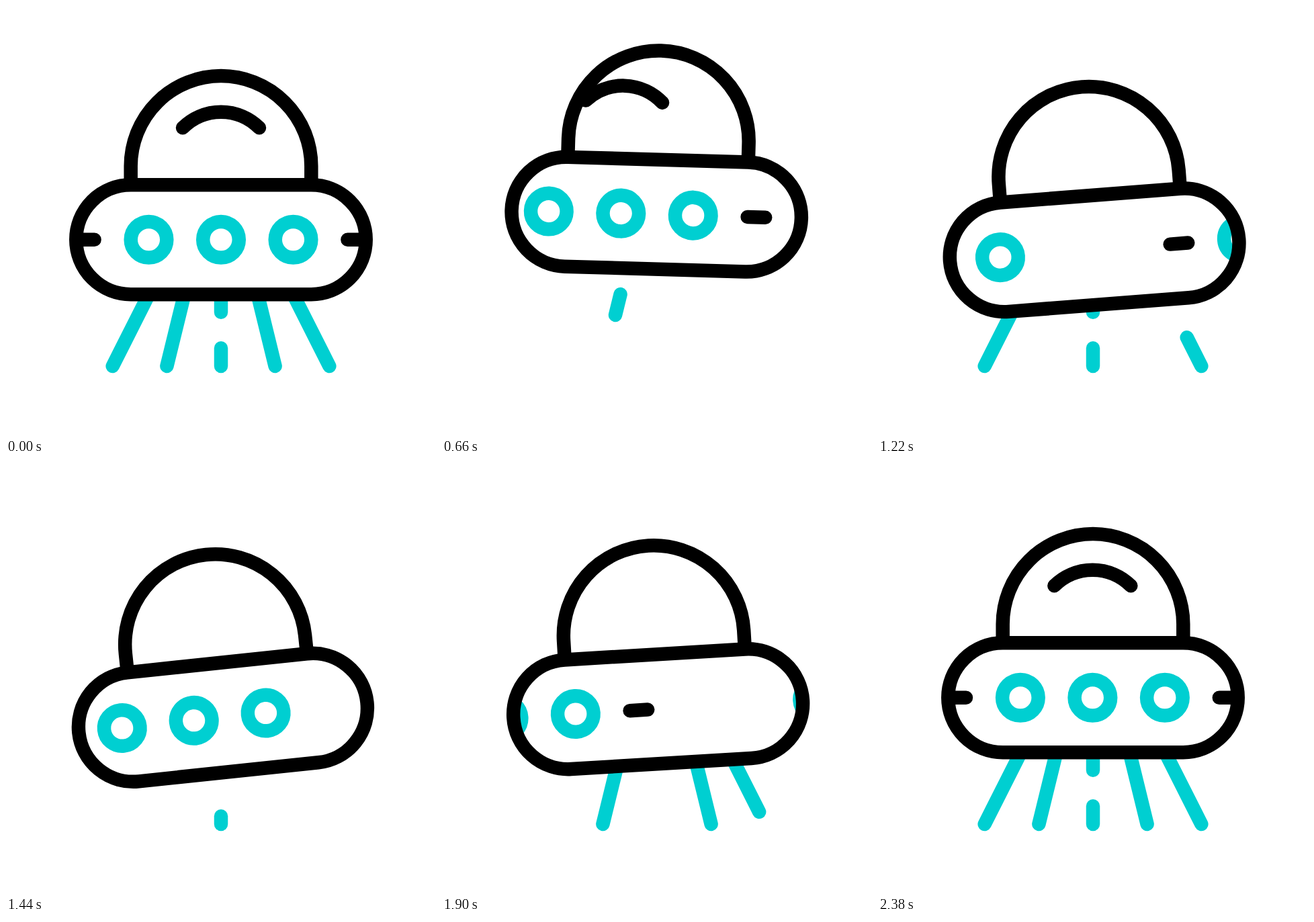
Recreate the animation shown at these times as an HTML page. Size 640 px wide and 640 px high, loop 2.4 s.

```html
<!DOCTYPE html>
<html lang="en">
<head>
<meta charset="utf-8">
<title>Flying saucer</title>
<style>
  html, body { margin: 0; width: 100%; height: 100%; overflow: hidden; background: #fff; }
  svg { display: block; width: 100%; height: 100%; }
  .ink { stroke: #000; }
  .glow { stroke: #00cfd1; }
</style>
</head>
<body>
<svg viewBox="0 0 640 640" fill="none" stroke-width="20.5" stroke-linecap="round">
  <defs>
    <path id="domeShape" d="M185.7 266V238.3A134.3 134.3 0 0 1 454.3 238.3V266"/>
    <rect id="hullShape" x="104.3" y="266.3" width="431.4" height="162.9" rx="81.45"/>
    <clipPath id="domeClip"><use href="#domeShape"/></clipPath>
    <clipPath id="hullClip"><use href="#hullShape"/></clipPath>
    <path id="shine" class="ink" d="M263 181.3A80.6 80.6 0 0 1 377 181.3"/>
    <g id="ports" class="glow">
      <circle cx="212.5" cy="347.7" r="26.8"/>
      <circle cx="320" cy="347.7" r="26.8"/>
      <circle cx="427.5" cy="347.7" r="26.8"/>
    </g>
    <path id="marks" class="ink" d="M105 347.7H131.6M508.4 347.7H535"/>
  </defs>
  <g id="beams" class="glow"></g>
  <g id="ship">
    <use href="#domeShape" fill="#fff"/>
    <g clip-path="url(#domeClip)">
      <g class="strip"><use href="#shine"/><use href="#shine" x="-1152"/></g>
    </g>
    <use href="#domeShape" class="ink" stroke-linecap="butt"/>
    <use href="#hullShape" fill="#fff"/>
    <g clip-path="url(#hullClip)">
      <g class="strip">
        <use href="#ports"/><use href="#marks"/>
        <use href="#ports" x="-576"/>
        <use href="#ports" x="-1152"/><use href="#marks" x="-1152"/>
      </g>
    </g>
    <use href="#hullShape" class="ink"/>
  </g>
</svg>
<script>
const LOOP = 2400, TOP = 429, BOTTOM = 536, SWEEP = 200;
const ship = document.getElementById('ship');
const strips = document.querySelectorAll('.strip');
const beamLayer = document.getElementById('beams');

// x at the top and bottom, lit parts, start times: hide, show, hide, show
const beams = [
  { x: [212.7, 158.7], parts: [[0, 1]], times: [350, 928, 1190, 1920] },
  { x: [265.6, 239.4], parts: [[0, 1]], times: [20, 602, 856, 1500] },
  { x: [320, 320], parts: [[0, .25], [.75, 1]], times: [420, 1010, 1262, 2000] },
  { x: [374.4, 400.6], parts: [[0, 1]], times: [120, 690, 1010, 1600] },
  { x: [427.3, 481.3], parts: [[0, 1]], times: [178, 780, 1100, 1734] }
];
for (const b of beams) {
  b.path = document.createElementNS('http://www.w3.org/2000/svg', 'path');
  beamLayer.append(b.path);
}

const clamp = v => Math.max(0, Math.min(1, v));
const ramp = (t, from, to) => clamp((t - from) / (to - from));
const smooth = u => u * u * (3 - 2 * u);
const mix = (a, b, k) => a + (b - a) * k;

// Ease with flat ends; x1 and x2 are the handle times
function ease(u, x1, x2) {
  let lo = 0, hi = 1;
  for (let i = 0; i < 24; i++) {
    const p = (lo + hi) / 2, q = 1 - p;
    const x = 3 * x1 * p * q * q + 3 * x2 * p * p * q + p * p * p;
    if (x < u) lo = p; else hi = p;
  }
  return smooth((lo + hi) / 2);
}

function hover(t, high, low) {
  if (t < 600) return high * smooth(t / 600);
  if (t < 1480) return mix(high, low, smooth(ramp(t, 600, 1480)));
  return low * (1 - smooth(ramp(t, 1480, LOOP)));
}

function slide(t) {
  if (t < 720) return -54 * smooth(t / 720);
  return mix(-54, 1152, ease(ramp(t, 720, LOOP), .135, .703));
}

function beamPath(b, t) {
  const k = b.times.map(s => ramp(t, s, s + SWEEP));
  let from = 0, to = 1;
  if (t < b.times[1]) from = k[0];
  else if (t < b.times[2]) to = k[1];
  else if (t < b.times[3]) from = k[2];
  else to = k[3];
  const point = p => mix(b.x[0], b.x[1], p) + ' ' + mix(TOP, BOTTOM, p);
  let d = '';
  for (const [a, z] of b.parts) {
    const start = Math.max(a, from), end = Math.min(z, to);
    if (end > start) d += `M${point(start)}L${point(end)}`;
  }
  return d;
}

function draw(t) {
  const y = hover(t, -38.5, 30.1), turn = hover(t, 1.75, -6.05);
  ship.setAttribute('transform', `translate(0 ${y}) rotate(${turn} 320 320)`);
  const x = slide(t);
  strips.forEach(s => s.setAttribute('transform', `translate(${x} 0)`));
  beams.forEach(b => b.path.setAttribute('d', beamPath(b, t)));
}

let begin;
function tick(now) {
  if (begin === undefined) begin = now;
  draw((now - begin) % LOOP);
  requestAnimationFrame(tick);
}
draw(0);
requestAnimationFrame(tick);
</script>
</body>
</html>
```
